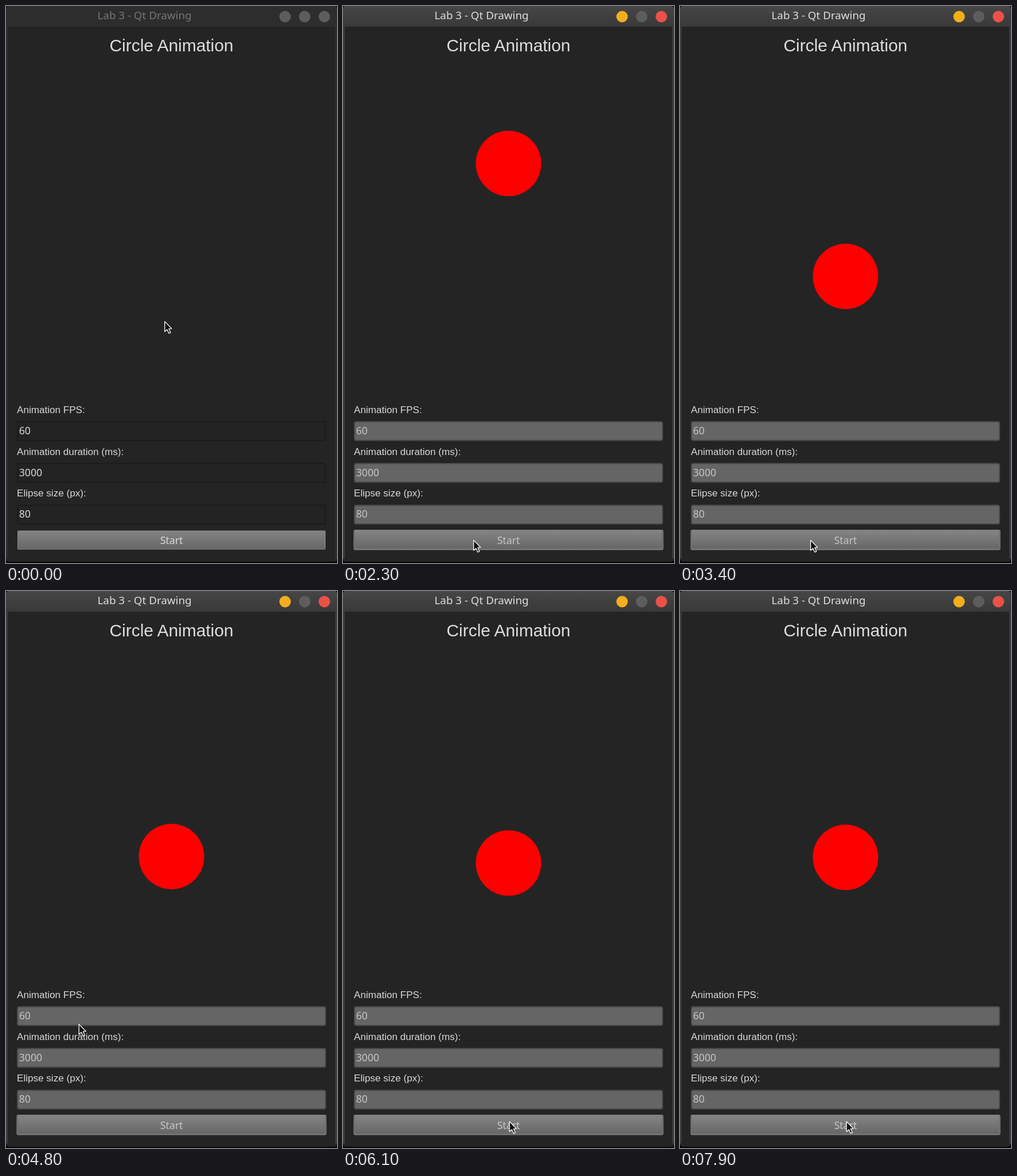
An HTML page that plays this animation: 577 px wide and 970 px high, repeating every 8000 ms.

```html
<!DOCTYPE html>
<html lang="en">
<head>
<meta charset="utf-8">
<title>Circle Animation</title>
<style>
  html, body { margin: 0; width: 100%; height: 100%; overflow: hidden; background: #000; }
  svg { display: block; width: 577px; height: 970px; }
  text { white-space: pre; }
  .frame { fill: #2d2d2d; }
  .caption { font: 18.8px "Noto Sans", sans-serif; fill: #757575; }
  .control { fill: #5d5d5d; }
  .heading { font: 29.9px "Liberation Sans", Arial, sans-serif; fill: #dedede; text-anchor: middle; }
  .label { font: 17.1px "Liberation Sans", Arial, sans-serif; fill: #dadada; }
  .value { font: 17.7px "Noto Sans", sans-serif; fill: #dadada; }
  .field { fill: #232323; stroke: #1b1b1b; stroke-width: 2; }
  .button { fill: url(#raised); stroke: #8b8b8b; }
  .glow { fill: none; stroke: #808080; stroke-width: 2; visibility: hidden; }
  .ball { fill: #f00; visibility: hidden; }

  .active .frame { fill: #3c3c3c; }
  .active .bar { fill: url(#bar); }
  .active .caption { fill: #dedede; }
  .active .minimize { fill: #f3ae1d; }
  .active .close { fill: #ec5148; }
  .active .ball { visibility: visible; }
  .active.waiting .ball { visibility: hidden; }
  .pressed .button { fill: #686868; stroke: #808080; }
  .running .field { fill: #656565; stroke: #4a4a4a; }
  .running .value { fill: #c6c6c6; }
  .running .button { stroke: none; }
  .running .glow { visibility: visible; }
</style>
</head>
<body>
<svg id="stage" viewBox="0 0 577 970">
  <defs>
    <linearGradient id="bar" x2="0" y2="1">
      <stop stop-color="#464646"/><stop offset="1" stop-color="#393939"/>
    </linearGradient>
    <linearGradient id="raised" x2="0" y2="1">
      <stop stop-color="#848484"/><stop offset="1" stop-color="#666"/>
    </linearGradient>
  </defs>

  <rect width="577" height="968" rx="5" fill="#242424"/>
  <path class="frame" d="M0 36H3V962H0ZM574 36H577V962H574Z"/>
  <path class="frame bar" d="M0 37V5Q0 0 5 0H572Q577 0 577 5V37Z"/>
  <rect x="3" y="36" width="571" height="2" fill="#242424"/>
  <text class="caption" x="159.5" y="22.5">Lab 3 - Qt Drawing</text>
  <circle class="control minimize" cx="486.5" cy="18.5" r="10"/>
  <circle class="control" cx="520.7" cy="18.5" r="10"/>
  <circle class="control close" cx="555" cy="18.5" r="10"/>

  <text class="heading" x="288.5" y="79">Circle Animation</text>
  <circle class="ball" id="ball" cx="288.5" r="57"/>

  <g id="form"></g>
  <rect class="button" x="20.5" y="914" width="536" height="32" rx="1"/>
  <rect class="glow" x="19.5" y="913" width="538" height="33.5" rx="2"/>
  <text class="value" x="288.5" y="937" text-anchor="middle">Start</text>

  <path id="cursor" d="M.7 .9V18.6L4.8 14.9L7.9 21.6L10.9 20.2L7.9 13.7L12.7 13.3Z"
        fill="#111" stroke="#fff" stroke-width="1.3" stroke-linejoin="round"/>
</svg>
<script>
const LOOP = 8000, TICK = 100;
const UNIT = 1.425;          // screen pixels per layout pixel
const REST = 463.8;          // resting centre of the ball
const DURATION = 3000;
const runs = [
  { press: 2100, release: 2200, start: 2207, drop: 206 },
  { press: 5800, release: 5900, start: 5866.5, drop: 212 }
];
// time, x, y of the pointer tip
const path = [
  [200, 276, 548.5], [500, 236, 610], [800, 211, 710], [1100, 217.5, 797],
  [1400, 290, 868], [1600, 262, 915], [1800, 227, 929.5],
  [4400, 227, 929.5], [4600, 168, 830], [4800, 126.5, 753.5], [4900, 126, 762],
  [5200, 190, 850], [5600, 289.5, 923]
];
const rows = [["Animation FPS:", "60"], ["Animation duration (ms):", "3000"], ["Elipse size (px):", "80"]];

const $ = id => document.getElementById(id);
const stage = $("stage"), ball = $("ball"), cursor = $("cursor");

$("form").innerHTML = rows.map(([label, value], i) => {
  const y = 709 + i * 72.7;
  return `<text class="label" x="19" y="${y}">${label}</text>
    <rect class="field" x="20" y="${y + 15}" width="537" height="32.5" rx="3"/>
    <text class="value" x="22.7" y="${y + 37}">${value}</text>`;
}).join("");

function elasticOut(t) {
  if (t <= 0) return 0;
  if (t >= 1) return 1;
  return 1 - 2 ** (-10 * t) * Math.cos(2 * Math.PI * t / 0.3);
}

function pointer(t) {
  const next = path.findIndex(p => p[0] > t);
  if (next === 0) return path[0].slice(1);
  if (next < 0) return path[path.length - 1].slice(1);
  const [t0, x0, y0] = path[next - 1], [t1, x1, y1] = path[next];
  const k = (t - t0) / (t1 - t0);
  return [x0 + (x1 - x0) * k, y0 + (y1 - y0) * k];
}

function draw(t) {
  const run = runs.find(r => t >= r.press && t < r.release);
  const last = runs.filter(r => t >= r.release).pop();
  const running = last && t < last.start + DURATION;
  const state = {
    active: t >= runs[0].press,
    waiting: !last,
    pressed: !!run,
    running: !!running
  };
  stage.setAttribute("class", Object.keys(state).filter(k => state[k]).join(" "));

  // the layout moves in whole units
  const offset = last ? Math.floor(last.drop * (elasticOut((t - last.start) / DURATION) - 1)) : 0;
  ball.setAttribute("cy", REST + offset * UNIT);
  cursor.setAttribute("transform", `translate(${pointer(t)})`);
}

const began = performance.now();
function step() {
  const t = (performance.now() - began + 5) % LOOP;
  draw(Math.floor(t / TICK) * TICK);
  requestAnimationFrame(step);
}
step();
</script>
</body>
</html>
```
